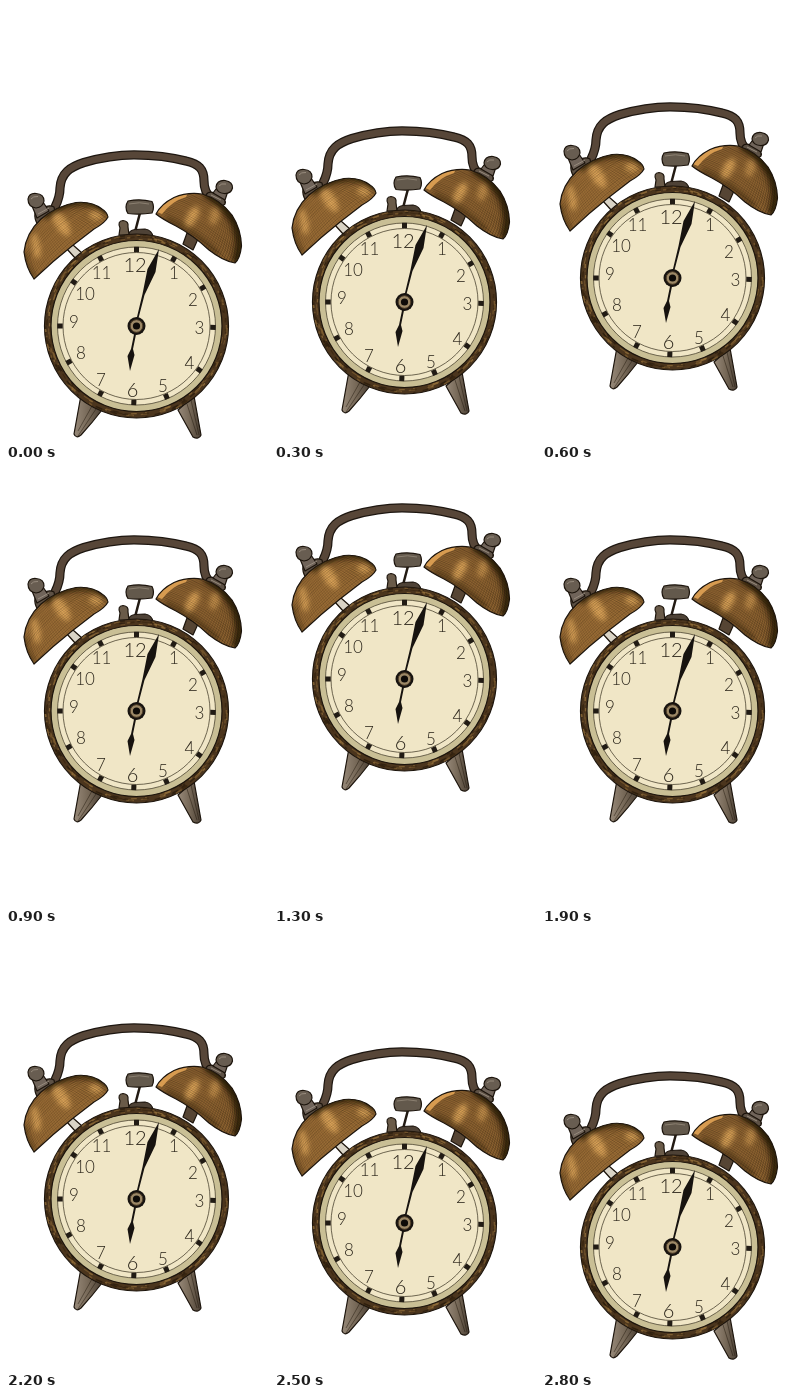
Write an HTML page that moves like this. It is 262 px wide and 436 px high and loops after 2900 ms.

```html
<!DOCTYPE html>
<html lang="en">
<head>
<meta charset="utf-8">
<title>Alarm clock</title>
<style>
  html, body { margin: 0; width: 100%; height: 100%; overflow: hidden; background: #fff; }
  svg { display: block; width: 262px; height: 436px; }
  #clock { will-change: transform; }
  .ink { stroke: #1c140c; stroke-width: 1.2; stroke-linejoin: round; stroke-linecap: round; }
  .hatch { fill: none; stroke: #1a1006; }
  .glow { fill: #d9a256; filter: url(#soft); }
  .shade { fill: none; stroke: #1d1206; filter: url(#soft); }
  #digits { font-family: Lato, sans-serif; font-weight: 300; fill: #2d271c; text-anchor: middle; }
</style>
</head>
<body>
<svg viewBox="0 0 262 436">
  <defs>
    <linearGradient id="steel" x1="0" y1="0" x2="1" y2="0">
      <stop offset="0" stop-color="#978979"/>
      <stop offset=".5" stop-color="#776958"/>
      <stop offset="1" stop-color="#4b4035"/>
    </linearGradient>
    <filter id="soft" x="-60%" y="-60%" width="220%" height="220%">
      <feGaussianBlur stdDeviation="2.5"/>
    </filter>
    <path id="domeL" d="M28 273Q20 262 18 246Q20 227 35 213Q50 200 70 196.500Q86 195 96 203Q101 206 102 211Q99 217 88 223L66 240Q47 255 28 273Z"/>
    <path id="domeR" d="M150 208Q155 198 168 191.500Q181 186 196 188Q214 193 226 209Q235 223 235.500 240Q234 253 229 257Q217 255 203 244Q187 229 170 220Q156 213 150 208Z"/>
    <path id="bar" d="M49 201Q54 191 54 182C55 167 64 161 78 156.500Q104 148.800 128 148.800Q158 149 180 155C193 158 198 163 198 175Q198 186 205 192"/>
    <clipPath id="clipL"><use href="#domeL"/></clipPath>
    <clipPath id="clipR"><use href="#domeR"/></clipPath>
  </defs>

  <g id="clock">
    <!-- feet -->
    <path class="ink" fill="url(#steel)" d="M75 389L96 404Q86 417 75 429Q70 433 68 428Z"/>
    <path class="ink" fill="url(#steel)" d="M172 404L188 390L195 429Q193 434 187 431Z"/>
    <path class="hatch" stroke-width=".8" opacity=".55" d="M90 403L72 430M86 400L72 425M185 394L193 429M181 398L191 429"/>

    <!-- bell posts -->
    <path fill="#d9d3c5" d="M61 244L67 239L76 247L70 254Z"/>
    <path class="ink" fill="none" d="M61 243L70 253M67 239L76 247"/>
    <path class="ink" fill="#564534" d="M181 227L192 233L187 244L177 238Z"/>

    <!-- handle -->
    <g fill="none" stroke-linecap="round">
      <use href="#bar" stroke="#1d1610" stroke-width="9.200"/>
      <use href="#bar" stroke="#574638" stroke-width="6.800"/>
    </g>

    <!-- hammer and winding knob -->
    <path class="ink" fill="#4e4236" d="M122 230Q123 224 129 223.500L139 223Q146 224 147 231Z"/>
    <path class="ink" fill="#6a5b49" d="M113 229L114 222Q111 215 117 214.500Q123 215 122 221L123 229Z"/>
    <path stroke="#221a13" stroke-width="2.500" fill="none" d="M134 207L129.500 224"/>
    <path class="ink" fill="#63594c" d="M122 195Q134 192.500 146 195.500Q149 201 146 207Q134 209 122 207.500Q118 201 122 195Z"/>
    <path fill="none" stroke="#8b8071" d="M123 198Q134 195.500 143 198"/>

    <!-- body -->
    <circle class="ink" cx="130.500" cy="320" r="92" fill="#4b351d"/>
    <g id="rim" fill="none"></g>
    <circle class="ink" cx="130.500" cy="320" r="85.500" fill="#c9bf95"/>
    <g fill="#f0e6c6" stroke="#4c4531" stroke-width=".8">
      <circle cx="130.500" cy="320" r="79"/>
      <circle cx="130.500" cy="320" r="73.500"/>
    </g>
    <g id="ticks" fill="#211b14"></g>
    <g id="digits"></g>

    <!-- hands -->
    <g fill="#17130f">
      <path d="M153 243L149.500 266L138.500 289L132 314L130.500 313L136.500 288L141.500 263Z"/>
      <path d="M128.500 326L130.500 326L127 343L128.500 349L124 365L121.500 350L125 343Z"/>
      <circle cx="130.500" cy="320" r="9"/>
    </g>
    <circle cx="130.500" cy="320" r="6.300" fill="#9c8866" stroke="#4d3c27"/>
    <circle cx="130.500" cy="320" r="3.600" fill="#0e0b08"/>

    <!-- left bell -->
    <path class="ink" fill="#5d5145" d="M29 207Q41 197 48 201Q50 206 44 211L32 219Q28 213 29 207Z"/>
    <path class="ink" fill="#70645a" d="M26 200L37 196L43 205L31 212Z"/>
    <path class="ink" fill="#685d51" d="M22 193Q23 187 30 187.500Q38 188 38 195Q37 201 30 202Q22 201 22 193Z"/>
    <path fill="none" stroke="#978b7d" d="M25 193Q27 190 32 190.500M32 208L43 202"/>
    <use href="#domeL" fill="#986b34"/>
    <g clip-path="url(#clipL)">
      <ellipse class="glow" cx="55" cy="217" rx="6" ry="15" transform="rotate(-32 55 217)"/>
      <ellipse class="glow" cx="90" cy="209" rx="7" ry="5"/>
      <ellipse class="glow" cx="30" cy="240" rx="4" ry="13" transform="rotate(-10 30 240)"/>
      <path class="shade" stroke-width="7" opacity=".75" d="M38 211Q52 198 72 196Q90 195 103 207"/>
      <path class="shade" stroke-width="5" opacity=".5" d="M18 246Q20 262 28 272"/>
      <g id="hatchL" class="hatch"></g>
    </g>
    <use href="#domeL" class="ink" fill="none"/>

    <!-- right bell -->
    <path class="ink" fill="#5d5145" d="M200 189Q203 184 211 188Q221 193 219 198L215 201L200 192Z"/>
    <path class="ink" fill="#70645a" d="M207 187L213 179L222 185L219 194Z"/>
    <path class="ink" fill="#685d51" d="M210 181Q211 174 219 174.500Q227 176 226.500 182Q225 188 218 187.500Q211 187 210 181Z"/>
    <path fill="none" stroke="#978b7d" d="M213 180Q215 177 220 178M205 189L215 194"/>
    <use href="#domeR" fill="#8c6230"/>
    <g clip-path="url(#clipR)">
      <ellipse class="glow" cx="186" cy="211" rx="5" ry="12" transform="rotate(28 186 211)"/>
      <ellipse class="glow" cx="209" cy="209" rx="5" ry="10" transform="rotate(15 209 209)" opacity=".7"/>
      <path class="shade" stroke-width="9" opacity=".8" d="M200 187Q222 200 231 220Q237 240 230 257"/>
      <path class="shade" stroke-width="5" opacity=".45" d="M160 212Q190 225 212 249"/>
      <g id="hatchR" class="hatch"></g>
      <path d="M151 206Q162 191 182 187L180 191Q166 195 156 208Z" fill="#d79b50"/>
    </g>
    <use href="#domeR" class="ink" fill="none"/>
  </g>
</svg>
<script>
const CX = 130.5, CY = 320;
const byId = id => document.getElementById(id);

function add(parent, tag, attrs, text) {
  const el = document.createElementNS("http://www.w3.org/2000/svg", tag);
  for (const key in attrs) el.setAttribute(key, attrs[key]);
  if (text) el.textContent = text;
  byId(parent).append(el);
}

let seed = 7;
function rand() {
  seed = (seed * 16807) % 2147483647;
  return seed / 2147483647;
}

function polar(deg, r) {
  const a = deg * Math.PI / 180;
  return [CX + Math.sin(a) * r, CY - Math.cos(a) * r];
}

// mottled brass rim
const tones = ["#7b5b2f", "#2a1c0e", "#94703b", "#382610"];
for (let i = 0; i < 230; i++) {
  const deg = rand() * 360, r = 86.5 + rand() * 4.5;
  const from = polar(deg, r), to = polar(deg + 1 + rand() * 4, r + rand() - 0.5);
  add("rim", "path", {
    d: `M${from}L${to}`, stroke: tones[i % 4], "stroke-width": 0.8 + rand(), opacity: 0.75
  });
}

// hour marks
for (const deg of [0, 29, 60, 91, 125, 157, 182, 208, 242, 270, 305, 332]) {
  const [x, y] = polar(deg, 76.5);
  add("ticks", "rect", {
    x: x - 2.5, y: y - 2.7, width: 5, height: 5.4, transform: `rotate(${deg} ${x} ${y})`
  });
}

// numerals: x, y of the middle
const spots = [
  [168, 267], [187, 293.5], [193.5, 322], [183.5, 357], [157, 379.5], [126.5, 384],
  [95, 374], [75, 347], [68, 316], [79, 288], [95.5, 267], [129, 259]
];
spots.forEach(([x, y], i) => {
  const size = i === 11 || i === 5 ? 20 : 17;
  add("digits", "text", { x, y: y + size * 0.36, "font-size": size }, String(i + 1));
});

// engraved lines following each dome, denser towards the shaded side
function engrave(id, x, y, tilt, shade) {
  const turn = `translate(${x} ${y}) rotate(${tilt})`;
  for (let i = 0; i < 26; i++) {
    const h = 2 + i * 1.8;
    add(id, "path", {
      d: `M-52 ${4 - h}Q0 ${-h * 1.25 - 4} 52 ${4 - h}`, transform: turn,
      "stroke-width": 0.55, opacity: 0.15 + 0.25 * rand()
    });
  }
  for (let i = 0; i < 34; i++) {
    const u = -46 + i * 2.8;
    const dark = Math.max(0.1, shade * u / 46);
    add(id, "path", {
      d: `M${u} 8Q${u * 0.95} -22 ${u * 0.3} -46`, transform: turn,
      "stroke-width": 0.7, opacity: 0.1 + dark * 0.35
    });
  }
}
engrave("hatchL", 65, 241, -41, 0.6);
engrave("hatchR", 190, 233, 33, 1);

// [ms, y shift, jumps until the next entry]
const LOOP = 2900;
const moves = [[0, 0, 6], [600, -48, 3], [900, -79, 5], [1400, -119, 15], [LOOP, 1, 1]];
byId("clock").animate(
  moves.map(([ms, y, jumps]) => ({
    offset: ms / LOOP, transform: `translateY(${y}px)`, easing: `steps(${jumps}, end)`
  })),
  { duration: LOOP, iterations: Infinity }
);
</script>
</body>
</html>
```
